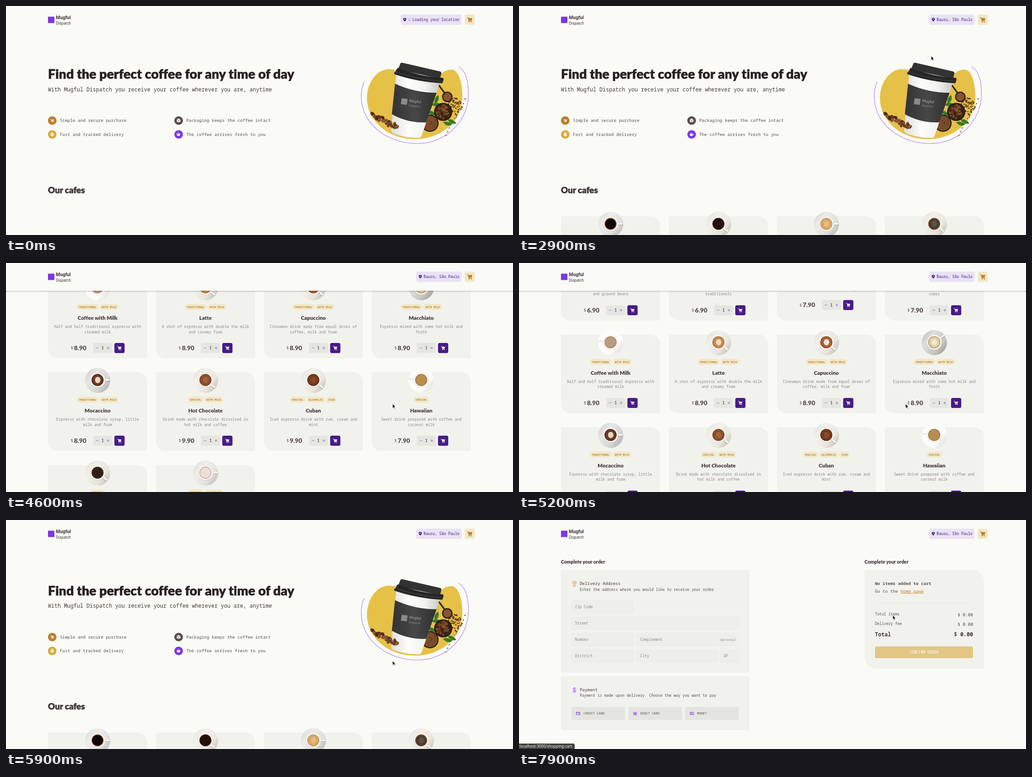
An HTML page that plays this animation: 1111 px wide and 504 px high, repeating every 8 s.

```html
<!DOCTYPE html>
<html lang="en">
<head>
<meta charset="utf-8">
<title>Coffee shop</title>
<style>
  html, body { margin: 0; width: 100%; height: 100%; overflow: hidden; background: #fafaf6; }
  svg { display: block; width: 1111px; height: 504px; }
  text { font-family: "Noto Sans Mono", "DejaVu Sans Mono", monospace; white-space: pre; font-variant-ligatures: none; }
  .display { font-family: Lato, "Open Sans", sans-serif; font-weight: 900; }
  .heavy { stroke: currentColor; stroke-width: .5; color: #272221; }
  .logo { font-family: Roboto, sans-serif; }
  .status { font-family: "Open Sans", sans-serif; }
  .mid { text-anchor: middle; }
  .end { text-anchor: end; }
  .bold { font-weight: 700; }
</style>
</head>
<body>
<svg id="stage" viewBox="0 0 1111 504"></svg>
<script>
const BG = '#fafaf6', CARD = '#f2f2ed', TITLE = '#272221', DARK = '#403937', TEXT = '#574f4d',
  LABEL = '#8d8686', GOLD = '#c17d2a', CREAM = '#f1e8c9', PURPLE = '#7c37e6', DEEP = '#471b86', GREY = '#e6e6e1';

const text = (x, y, size, str, fill = TEXT, cls = '', extra = '') =>
  `<text x="${x}" y="${y}" font-size="${size}" fill="${fill}" class="${cls}" ${extra}>${str}</text>`;
const rect = (x, y, w, h, r, fill, extra = '') =>
  `<rect x="${x}" y="${y}" width="${w}" height="${h}" rx="${r}" fill="${fill}" ${extra}/>`;
const circle = (x, y, r, fill, extra = '') => `<circle cx="${x}" cy="${y}" r="${r}" fill="${fill}" ${extra}/>`;
const path = (d, fill = 'none', extra = '') => `<path d="${d}" fill="${fill}" ${extra}/>`;
const line = (d, color, width) => path(d, 'none', `stroke="${color}" stroke-width="${width}" stroke-linecap="round"`);
const group = (x, y, inner, more = '') => `<g transform="translate(${x} ${y}) ${more}">${inner}</g>`;

// Box with two small corners and two large ones (top right, bottom left)
const leaf = (x, y, w, h, R, r = 3.5) => path(
  `M${x + r} ${y}h${w - r - R}a${R} ${R} 0 0 1 ${R} ${R}v${h - R - r}a${r} ${r} 0 0 1 ${-r} ${r}` +
  `h${r + R - w}a${R} ${R} 0 0 1 ${-R} ${-R}v${R + r - h}a${r} ${r} 0 0 1 ${r} ${-r}z`, CARD);

let seed = 7;
const rnd = () => (seed = seed * 16807 % 2147483647) / 2147483647;

const cartIcon = (x, y, k, color) => group(x, y,
  line('M-6.2-5h2.2l2.2 8.2h6', color, 1.3) + path('M-3.8-3.8H6.2L4.6 2H-2.4z', color) +
  circle(-1.2, 5.2, 1.3, color) + circle(4, 5.2, 1.3, color), `scale(${k})`);

const pin = (x, y) => path(`M${x} ${y + 4}C${x - 6} ${y - 2} ${x - 3} ${y - 4} ${x} ${y - 4}` +
  `S${x + 6} ${y - 2} ${x} ${y + 4}z`, DEEP) + circle(x, y - 1, 1.1, '#e9e2f5');

function bean(x, y, size) {
  const tone = ['#5a3019', '#7a4826', '#9c6639'][Math.floor(rnd() * 3)];
  return group(x, y, `<ellipse rx="${size}" ry="${size * .68}" fill="${tone}"/>` +
    line(`M${-size * .7} 0q${size * .7} ${-size * .5} ${size * 1.4} 0`, '#2b150b', size * .2),
    `rotate(${rnd() * 180})`);
}

function beans(count, size, place) {
  let out = '';
  for (let i = 0; i < count; i++) out += bean(...place(i / count), size);
  return out;
}

const inDisc = (cx, cy, r) => () => {
  const a = rnd() * 6.283, d = Math.sqrt(rnd()) * r;
  return [cx + Math.cos(a) * d, cy + Math.sin(a) * d];
};

const bowl = (x, y, r, fill) => circle(x, y, r, '#26211e') + circle(x, y, r - 2.5, fill);
const sprig = (x, y, a) => group(x, y, path('M0 0Q7-9 20-4Q13 7 0 0z', '#3d8228') +
  line('M1 0L17-3', '#225a18', .7), `rotate(${a})`);

function heroPicture() {
  return path('M791 203C791 168 813 139 839 139C880 139 905 185 930 170C950 158 955 140 976 140' +
      'C992 140 1000 170 1000 200C1000 255 952 293 896 293C834 293 791 250 791 203z', '#e6c148') +
    line('M785 167C780 177 778.4 187 778.4 198C778.4 258 833 302.7 902 302.7' +
      'C965 302.7 1013.5 252 1013.5 193C1013.5 165 1006 140 992 133.5', '#b78ff0', 1.3) +
    beans(60, 2, inDisc(980, 222, 20)) +
    beans(12, 1.6, p => [1006 - p * 46, 203 + p * 82 + rnd() * 8]) +
    line('M966 198L949 175', '#2b2826', 3.5) + bowl(967, 200, 11.5, '#8a5430') +
    sprig(953, 217, 190) + sprig(942, 240, 215) + sprig(940, 215, -60) + sprig(958, 256, 25) + sprig(968, 250, 35) +
    bowl(929, 258, 19, '#7a4c2a') + beans(30, 1.2, inDisc(929, 258, 14)) +
    bowl(958, 233, 20, '#3a2114') + beans(50, 2.6, inDisc(958, 233, 15)) +
    path('M855 150L844 273Q844 279 850 281Q878 291 904 290Q909 290 911 285L951 168z', 'url(#paper)') +
    path('M852.5 171Q896 191 943.5 191L921 256Q880 258 845.5 238z', 'url(#sleeve)') +
    path('M864 127Q865 124 869 125L951 144Q955 145 954 149L951 160L859 140z', '#323232') +
    path('M858 136Q908 156 957 158Q960 160 958 165L956 170Q900 167 851 150Q849 147 853 145z', '#262626') +
    line('M855 145Q905 163 955 165', '#4c4c4c', 1.2) +
    group(867, 203, rect(0, 0, 13, 13, 0, '#8b8b8b') +
      text(17, 6, 8.2, 'Mugful', '#8b8b8b', 'logo bold') + text(17, 16, 6.6, 'Dispatch', '#8b8b8b', 'logo'), 'rotate(7)') +
    beans(30, 4.5, p => [801 + p * 57 + rnd() * 5, 237 + p * 31 + rnd() * 10 - 3]);
}

function feature(x, y, color, icon, label) {
  return circle(x, y, 9.4, color) + icon + text(x + 16.7, y + 3, 9.36, label);
}

function hero() {
  const W = '#faf6ee';
  return text(92, 160, 28.6, 'Find the perfect coffee for any time of day', TITLE, 'display heavy') +
    text(92, 187.6, 11.69, 'With Mugful Dispatch you receive your coffee wherever you are, anytime', DARK) +
    feature(101.3, 252.2, GOLD, cartIcon(101.3, 252.2, .6, W), 'Simple and secure purchase') +
    feature(101.3, 282.6, '#dba93b', circle(101.3, 283, 3.7, W) + line('M100 278h2.6', W, 1) +
      line('M101.3 283l1.6-1.6', '#dba93b', .8), 'Fast and tracked delivery') +
    feature(378.3, 252.2, TEXT, path('M378.3 247.6l4 2.2v4.6l-4 2.2l-4-2.2v-4.6z', W) +
      line('M374.6 250l3.7 2l3.7-2M378.3 252v4', TEXT, .7), 'Packaging keeps the coffee intact') +
    feature(378.3, 282.6, PURPLE, path('M374.3 281h7q0 5-2 5h-3q-2 0-2-5z', W) +
      line('M381.3 282q2.4 0 .2 2M376.3 279.5v-1M378.3 279.5v-1', W, .8), 'The coffee arrives fresh to you') +
    heroPicture() + text(92, 411.5, 18.8, 'Our cafes', DARK, 'display heavy');
}

// name | description | price | tags | saucer, rim, coffee, foam | handle angle
const coffees = `Traditional Espresso|Traditional coffee made with hot water/and ground beans|6.90|TRADITIONAL|#d8d8d5 #94521f #0d0705|0
American Espresso|Diluted espresso, less intense than/traditionals|6.90|TRADITIONAL|#e4e0d5 #3a1a10 #21100b|40
Creamy Espresso|Traditional espresso with creamy foam|7.90|TRADITIONAL|#d5d5d3 #c99655 #d8a768 #e3bb83|0
Iced American|Drink prepared with espresso and ice/cubes|7.90|TRADITIONAL,ICED|#e4e0d5 #97531f #493c32 #5d5148|40
Coffee with Milk|Half and half traditional espresso with/steamed milk|8.90|TRADITIONAL,WITH MILK|#fcfbf9 #a58767 #b89c7e|180
Latte|A shot of espresso with double the milk/and creamy foam|8.90|TRADITIONAL,WITH MILK|#e2ded4 #b06e30 #c4894e #ecd9bd|40
Capuccino|Cinnamon drink made from equal doses of/coffee, milk and foam|8.90|TRADITIONAL,WITH MILK|#e2ded6 #8a3d18 #ab6033 #f2e6d8|40
Macchiato|Espresso mixed with some hot milk and/froth|8.90|TRADITIONAL,WITH MILK|#b9b9b1 #b3914f #dfcfae #efe8d6|-35
Mocaccino|Espresso with chocolate syrup, little/milk and foam|8.90|TRADITIONAL,WITH MILK|#cbcac9 #4a2213 #6b3a24 #e5d4c2|0
Hot Chocolate|Drink made with chocolate dissolved in/hot milk and coffee|9.90|SPECIAL,WITH MILK|#e4e0d6 #7d3d1d #8f4e2a #a0623c|40
Cuban|Iced espresso drink with rum, cream and/mint|9.90|SPECIAL,ALCOHOLIC,ICED|#e4e0d6 #5c2a10 #76391a #87492a|40
Hawaiian|Sweet drink prepared with coffee and/coconut milk|7.90|SPECIAL|#fcfbf8 #9f7638 #b78d50|180
Arabic|Drink prepared with Arabic coffee beans/and spices|7.90|SPECIAL|#e2ded4 #4a2e1b #2e2019|40
Irish|Coffee drink with whiskey, sugar and/whipped cream|8.90|SPECIAL,ALCOHOLIC|#dedad5 #c7a99b #ebdfd9|0`.split('\n');

function cup(colors, angle) {
  const [saucer, rim, coffee, foam] = colors.split(' ');
  return circle(0, 0, 27.5, saucer) + circle(0, 0, 27.5, 'url(#shade)') +
    group(0, -1, line('M15 1.5H25', '#00000022', 4) + line('M15 0H25', '#fbfaf7', 3.2), `rotate(${angle})`) +
    circle(0, -.5, 17, '#00000014') + circle(0, -1, 16.3, '#f6f5f1') + circle(-.4, -1, 13.2, rim) + circle(-.4, -1, 11.6, coffee) +
    (foam ? `<ellipse cx="0" cy="-1" rx="6" ry="7" fill="${foam}"/>` : '');
}

function card(row, i) {
  const [name, desc, price, tags, colors, angle] = row.split('|');
  const lines = desc.split('/'), mid = 108.7, base = lines.length > 1 ? 150.5 : 139;
  const labels = tags.split(','), widths = labels.map(s => s.length * 3.51 + 9.4);
  let x = mid - (widths.reduce((a, b) => a + b) + 2.4 * (labels.length - 1)) / 2;
  let out = leaf(0, 0, 217.5, 173, 21) + group(mid + .3, 18, cup(colors, angle));
  labels.forEach((label, k) => {
    out += rect(x, 53.7, widths[k], 13, 6.5, CREAM) +
      text(x + widths[k] / 2, 62.4, 5.85, label, GOLD, 'mid bold');
    x += widths[k] + 2.4;
  });
  out += text(mid, 88.8, 11.6, name, DARK, 'mid display');
  lines.forEach((s, k) => out += text(mid, 106.5 + k * 11.6, 8.19, s, LABEL, 'mid'));
  out += group(0, base, text(50, 3.4, 8.19, '$') + text(57, 4.8, 13.8, price, TEXT, 'display') +
    rect(99, -11, 42, 22, 3.5, GREY) + line('M105.4 0h5', '#8a63c8', .9) + line('M129.2 0h5M131.7-2.5v5', '#8a63c8', .9) +
    text(119.8, 3.4, 9.36, '1', TITLE, 'mid') + rect(145.5, -11, 22.4, 22.2, 3.5, DEEP) + cartIcon(156.5, 0, .72, '#f6f2fb'));
  return group(92 + i % 4 * 236.4, 462.5 + Math.floor(i / 4) * 204, out);
}

const chip = (x, label, textX, extra = '') => rect(x, 19, 998 - x, 22.5, 3.8, '#e9e2f4') +
  pin(x + 8.8, 30.2) + extra + text(textX, 33, 8.19, label, DEEP);

function header() {
  return rect(0, 0, 1111, 61, 0, BG) + rect(92, 23.5, 14, 14, 0, PURPLE) +
    text(109.5, 29, 10.2, 'Mugful', DARK, 'logo bold') + text(109.5, 40.5, 8.3, 'Dispatch', DARK, 'logo') +
    `<g id="loading">${chip(865, 'Loading your location', 890.5,
      circle(884.7, 30.3, 2.2, 'none', 'id="spinner" stroke="#a78fc6" stroke-width=".9" stroke-dasharray="10.4 3.4"'))}</g>` +
    `<g id="located">${chip(899, 'Bauru, São Paulo', 915)}</g>` +
    rect(1005, 19, 22.5, 22.5, 3.8, CREAM) + cartIcon(1016, 30, .95, GOLD);
}

const field = (x, y, w, label) => rect(x + .3, y, w, 26.8, 2.4, '#eeeeea', 'stroke="#e5e5e0" stroke-width=".6"') +
  text(x + 7.5, y + 16.3, 8.19, label, LABEL);
const payment = (x, label, icon) => rect(x, 411.3, 117.3, 28.8, 3.5, '#e5e5e0') +
  group(x + 14.5, 425.8, path(icon, 'none', `stroke="${PURPLE}" stroke-width=".9"`)) + text(x + 26, 428.4, 7.02, label);
const total = (label, y, size, cls = '') => text(780, y, cls ? size : 8.19, label, cls ? DARK : TEXT, cls) +
  text(995, y + (cls ? 0 : 1.5), size, '$ 0.00', cls ? DARK : TEXT, 'end ' + cls);

function checkout() {
  return text(92, 95.5, 10.4, 'Complete your order', DARK, 'display') + text(757, 95.5, 10.4, 'Complete your order', DARK, 'display') +
    rect(92, 109.5, 413, 226.5, 3.5, CARD) +
    line('M121.5 143.5C114 136 118 135 121.5 135S129 136 121.5 143.5zM118.5 145.5h6', GOLD, .9) +
    circle(121.5, 138.5, 1.5, 'none', `stroke="${GOLD}" stroke-width=".8"`) +
    text(133, 143.2, 9.36, 'Delivery Address', DARK) +
    text(133, 155.6, 8.19, 'Enter the address where you would like to receive your order') +
    field(115, 177.3, 135, 'Zip Code') + field(115, 213.6, 366.5, 'Street') + field(115, 249.8, 135, 'Number') +
    field(258, 249.8, 223.5, 'Complement') + text(474.5, 265.8, 7.02, 'Optional', LABEL, 'end', 'font-style="italic"') +
    field(115, 286, 135, 'District') + field(258, 286, 175.5, 'City') + field(441, 286, 40.5, 'UF') +
    rect(92, 343.5, 413, 119.5, 3.5, CARD) +
    line('M124.8 372q0-2.3-3.3-2.3t-3.3 2.2t3.3 2.2t3.4 2.3t-3.4 2.3t-3.4-2.3M121.5 368.5v11.2', PURPLE, .9) +
    text(133, 377.2, 9.36, 'Payment', DARK) +
    text(133, 389.4, 8.19, 'Payment is made upon delivery. Choose the way you want to pay') +
    payment(115, 'CREDIT CARD', 'M-4-2.8h8v5.6h-8zM-4-1h8M1 1.4h1.8') +
    payment(239.8, 'DEBIT CARD', 'M-4-.8L0-3.5L4-.8zM-2.6-.8v3M-.8-.8v3M.8-.8v3M2.6-.8v3M-4 3h8') +
    payment(364.3, 'MONEY', 'M-4-2.6h8v5.2h-8zM-1.3 0a1.3 1.3 0 1 0 2.6 0a1.3 1.3 0 1 0-2.6 0M-4-.8l1.8-1.8M4 .8l-1.8 1.8') +
    leaf(757, 109.5, 262, 217.5, 25.7) + text(780, 143.3, 9.36, 'No items added to cart', TEXT, 'bold') +
    text(780, 159.8, 9.36, 'Go to the') + text(836.2, 159.8, 9.36, 'home page', GOLD, '', 'text-decoration="underline"') +
    line('M780 182.3H995', '#e6e6e1', .7) + total('Total items', 210, 9.36) + total('Delivery fee', 231, 9.36) +
    total('Total', 256.2, 11.69, 'bold') + rect(780, 278.3, 215, 25.7, 3.5, '#e3c684') +
    text(887.5, 294.2, 8.19, 'CONFIRM ORDER', '#fff', 'mid');
}

const stop = (at, color) => `<stop offset="${at}" stop-color="${color}"/>`;
const $ = id => document.getElementById(id);

$('stage').innerHTML = `<defs>
  <linearGradient id="shade" x2="1" y2=".8">${stop(0, '#ffffff00')}${stop(.35, '#ffffff88')}${stop(.75, '#ffffff33')}${stop(1, '#00000010')}</linearGradient>
  <linearGradient id="paper">${stop(0, '#dededc')}${stop(.35, '#fdfdfc')}${stop(.7, '#f1f1ef')}${stop(1, '#c9c8c4')}</linearGradient>
  <linearGradient id="sleeve">${stop(0, '#333')}${stop(.5, '#474747')}${stop(1, '#303030')}</linearGradient>
  <linearGradient id="fall" x2="0" y2="1">${stop(0, '#0000002e')}${stop(1, '#0000')}</linearGradient></defs>` +
  rect(0, 0, 1111, 504, 0, BG) +
  `<g id="home">${hero()}<g id="cards">${coffees.map(card).join('')}</g></g>` +
  `<g id="checkout">${checkout()}</g>` + header() + rect(0, 61, 1111, 4, 0, 'url(#fall)', 'id="shadow"') +
  `<g id="status">${path('M0 492H119q3 0 3 3V504H0z', '#3b3a37')}${text(1, 501.3, 8.5, 'localhost:3000/shopping-cart', '#fff', 'status')}</g>` +
  `<g id="cursor">${path('M0 0V9.6L2.2 7.6L3.8 11L5.4 10.3L3.9 6.9H6.9z', '#111', 'stroke="#fff" stroke-width=".8"')}</g>`;

// Each key: time, then values
const scrollKeys = [[0, 0], [3900, 0], [4100, 16.5], [4300, 240], [4600, 630], [4800, 630], [4900, 636], [5000, 636],
  [5100, 590], [5500, 266.5], [5800, 15], [5900, -5.5]];
const cursorKeys = [[900, 700, 330], [1300, 822, 186], [1500, 861, 96], [1700, 956, 59], [1800, 956, 59],
  [2100, 1016, 25], [2400, 919, 91], [2500, 919, 91], [2800, 1044, 70], [3100, 621, 190], [3400, 760, 253],
  [4100, 903, 227], [4400, 847, 310], [6100, 847, 310], [7000, 1014, 29], [7500, 1014, 29], [7700, 817, 198],
  [7800, 817, 198], [7900, 819, 209.5]];

function track(keys, t) {
  const i = keys.findIndex(k => k[0] > t);
  if (i < 1) return keys.at(i).slice(1);
  const [a, b] = [keys[i - 1], keys[i]], p = (t - a[0]) / (b[0] - a[0]);
  return a.slice(1).map((v, k) => v + (b[k + 1] - v) * p);
}

const show = (id, on) => $(id).style.display = on ? '' : 'none';

function draw(now) {
  const t = Math.floor(now % 8000 / 100) * 100; // the picture ticks ten times a second
  const [scroll] = track(scrollKeys, t), paid = t >= 7500;
  $('home').setAttribute('transform', `translate(0 ${-scroll})`);
  $('cursor').setAttribute('transform', `translate(${track(cursorKeys, t).join(' ')})`);
  $('spinner').setAttribute('transform', `rotate(${Math.min(t, 500) * .6} 884.7 30.3)`);
  show('cursor', t >= 900);
  show('cards', t >= 700);
  show('loading', t < 700);
  show('located', t >= 700);
  show('home', !paid);
  show('checkout', paid);
  show('shadow', !paid && scroll > 40);
  $('status').style.opacity = t >= 7900 ? .96 : Math.max(0, Math.min(1, (t - 6900) / 300));
  requestAnimationFrame(draw);
}
requestAnimationFrame(draw);
</script>
</body>
</html>
```
